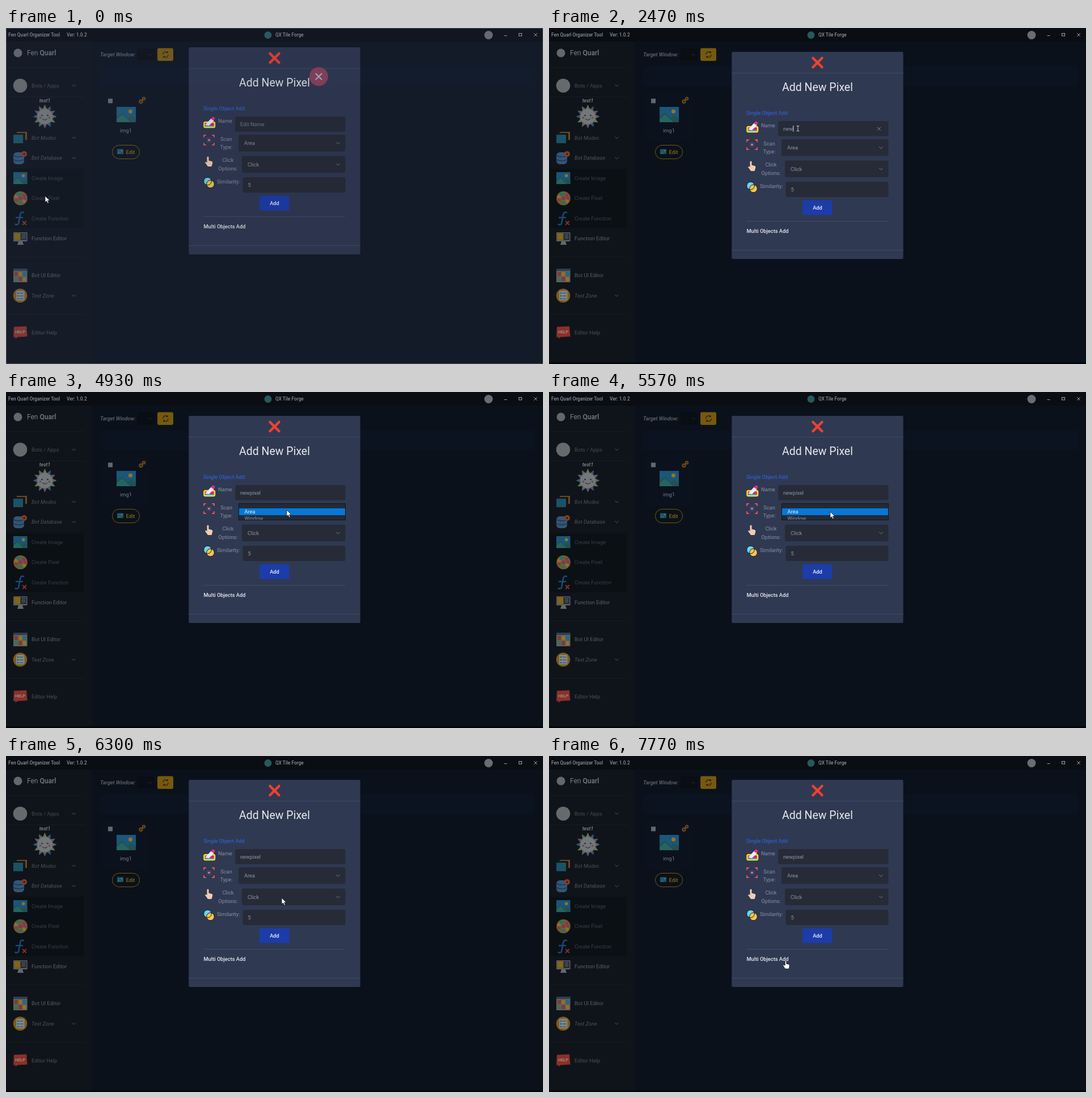
An HTML page that plays this animation: 947x592 px, repeating every 8 s.

```html
<!DOCTYPE html>
<html lang="en">
<head>
<meta charset="utf-8">
<title>Add New Pixel</title>
<style>
  html, body { margin: 0; width: 100%; height: 100%; overflow: hidden; background: #0b111b; }
  svg { display: block; width: 947px; height: 592px; font: 9.27px Roboto, sans-serif; }
  .i { font-style: italic; }
  .m { font-weight: 500; }
  .c { text-anchor: middle; }
  .line { fill: none; stroke-linecap: round; stroke-linejoin: round; }
</style>
</head>
<body>
<svg id="stage" viewBox="0 0 947 592"></svg>
<script>
const LOOP = 8000;
const NAME = 'newpixel';

const rect = (x, y, w, h, fill, r = 0, extra = '') =>
  `<rect x="${x}" y="${y}" width="${w}" height="${h}" rx="${r}" fill="${fill}" ${extra}/>`;
const circle = (x, y, r, fill, extra = '') => `<circle cx="${x}" cy="${y}" r="${r}" fill="${fill}" ${extra}/>`;
const path = (d, fill, extra = '') => `<path d="${d}" fill="${fill}" ${extra}/>`;
const line = (d, color, w = 1) => `<path class="line" d="${d}" stroke="${color}" stroke-width="${w}"/>`;
const text = (x, mid, str, fill, cls = '', size = 9.27) =>
  `<text x="${x}" y="${mid + size * .35}" fill="${fill}" class="${cls}" font-size="${size}">${str}</text>`;
const group = (id, body, extra = '') => `<g id="${id}" ${extra}>${body}</g>`;
const move = (x, y, body) => `<g transform="translate(${x} ${y})">${body}</g>`;
const dim = body => `<g opacity=".82">${body}</g>`;
const chevron = (x, y, color) => line(`M${x - 3} ${y - 1.5}l3 3 3-3`, color, .9);
const cross = (x, y, r, color, w) => line(`M${x - r} ${y - r}l${2 * r} ${2 * r}m0 ${-2 * r}l${-2 * r} ${2 * r}`, color, w);
const ring = (n, draw) => Array.from({ length: n }, (_, k) => draw(k, k * 2 * Math.PI / n)).join('');

const picture = (w, h) =>
  rect(0, 0, w, h, '#1f6590') +
  path(`M0 ${h}V${h * .62}L${w * .3} ${h * .38} ${w * .58} ${h * .75} ${w * .75} ${h * .55} ${w} ${h * .8}V${h}z`, '#28605c') +
  path(`M0 ${h}V${h * .8}L${w * .3} ${h * .5} ${w * .7} ${h}z`, '#2d7773') +
  circle(w * .72, h * .3, h * .13, '#b58a24');

function titleBar() {
  return rect(0, 0, 947, 24, '#0a0d12') +
    text(4, 12, 'Fen Quarl Organizer Tool', '#8e9298', 'm', 8.3) +
    text(107, 12, 'Ver: 1.0.2', '#8e9298', 'm', 8.3) +
    circle(462, 12.5, 6.5, '#255a5c') +
    text(475, 12, 'QX Tile Forge', '#8e9298', 'm', 8.3) +
    circle(851, 12.5, 7.5, '#696c72') +
    line('M879 13.5h4', '#a2a5aa') +
    rect(904.5, 9.5, 5, 4.5, 'none', 0, 'stroke="#a2a5aa"') +
    cross(934, 12, 2.5, '#a2a5aa', 1);
}

function flower() {
  const hues = ['#858257', '#3c6887', '#81606c', '#637a80'];
  return move(68.5, 156,
    ring(12, (k, a) => path('M-5 -10L0 -21 5 -10z', hues[k % 4], `transform="rotate(${a * 180 / Math.PI})"`)) +
    circle(0, 0, 13.5, '#8b8d90') + circle(-5, -2, 1.3, '#252b35') + circle(5, -2, 1.3, '#252b35') +
    line('M-4 4q4 4 8 0', '#4a4750', 1.2) + circle(-8, 2, 2, '#78616a') + circle(8, 2, 2, '#78616a'));
}

function sidebarIcons() {
  const dots = ['#a43d6b', '#a88824', '#317e96', '#56813d'];
  return circle(21, 44, 7.5, '#777a80') + flower() +
    circle(25, 101.5, 12.3, '#7b7d7f') +
    rect(19, 183, 18, 14, '#8a5220') + rect(16, 185, 18, 14, '#111820') + rect(13, 188, 17, 15, '#1d6078') +
    rect(13, 219, 19, 21, '#3d6589', 6) + [225, 232].map(y => line(`M13 ${y}q9.5 4 19 0`, '#1d3c5d', 1.5)).join('') +
    circle(32, 222, 5, '#a0472a') + circle(32, 222, 1.8, '#28212a') +
    move(13, 254, picture(24.5, 21)) +
    circle(25.5, 300, 12.3, '#8d7225') +
    ring(9, (k, a) => circle(25.5 + 8 * Math.cos(a), 300 + 8 * Math.sin(a), 3, dots[k % 4])) +
    circle(25.5, 300, 3.5, '#a43d6b') +
    line('M31 325q-5-2-6 4l-2.5 14q-1 5-6 3M18 334h11', '#1e568d', 2.5) + cross(32.5, 343.5, 2.7, '#a83530', 2) +
    rect(13, 360, 24.5, 16, '#6d7075', 1) + rect(14.5, 361.5, 21.5, 12, '#222b35') +
    rect(14.5, 361.5, 11, 12, '#9b7818') + [364, 367, 370].map(y => line(`M28 ${y}h6`, '#8a8d91')).join('') +
    path('M22 376h7l2 6H20z', '#777a7e') +
    rect(13, 424, 24.5, 24, '#6c737b', 1) + rect(13, 424, 24.5, 4, '#35485a') +
    ring(6, k => rect(15 + k % 3 * 7.3, k < 3 ? 430 : 439, 6, 7, ['#9d4035', '#bb8420', '#287d91', '#54824b'][k % 4])) +
    circle(25, 471.5, 12.3, '#996a17') + rect(18, 463, 14.5, 17, '#98a0a3', 2) +
    [467, 472, 477].map(y => circle(21, y, 1.3, '#285e7d') + line(`M24 ${y}h6`, '#43708a', 1.3)).join('') +
    path('M14 526.5l22-1 1.5 18-17 1-4 3v-3h-3.5z', '#a5382e') +
    text(25, 535.5, 'HELP', '#c4b1a6', 'm c', 7.4);
}

function sidebar() {
  const rows = [
    [101.5, 'Bots / Apps', '#51565e', '', 1], [193.5, 'Bot Modes', '#555a61', 'i', 1],
    [229, 'Bot Database', '#5d6269', 'i', 1], [264.5, 'Create Image', '#41474f'],
    [300, 'Create Pixel', '#41474f'], [335.5, 'Create Function', '#41474f'],
    [371, 'Function Editor', '#6d7279'], [436, 'Bot UI Editor', '#666b72'],
    [471.5, 'Test Zone', '#5a5f66', 'i', 1], [537, 'Editor Help', '#575c64']
  ];
  return rect(0, 24, 151, 568, '#0f141a') + rect(0, 248, 138, 105, '#0b1015') +
    [69, 121, 403, 504].map(y => rect(0, y, 138, 1, '#161b22')).join('') +
    dim(sidebarIcons() +
      `<text x="37" y="48" font-size="12" fill="#92959b">Fen <tspan class="m">Quarl</tspan></text>` +
      rows.map(([y, label, color, cls, open]) =>
        text(45, y, label, color, cls) + (open ? chevron(119.5, y, '#6b7078') : '')).join('') +
      text(68.5, 128, 'test1', '#a0a3a8', 'i m c', 8.8));
}

function workspace() {
  return path('M152 592V33q0-9 9-9H947V592z', '#0b111b') +
    rect(232, 36, 31, 21, '#090d14', 3) +
    rect(166, 68, 766, 34, '#0c1320', 2) + rect(170, 115, 82, 85, '#0b121d', 3) +
    dim(text(166, 47, 'Target Window:', '#777b82', 'i m') + chevron(254.5, 47, '#30363e') +
      rect(267, 35.5, 28, 22.5, '#8e690b', 3) +
      line('M277 46a4.5 4.5 0 0 1 8-2.5v-2m0 2h-2M286 47.5a4.5 4.5 0 0 1-8 2.5v2m0-2h2', '#16191e', 1.1) +
      rect(180, 124.5, 8, 8, '#777b80') +
      line('M236 131l6-6', '#805514', 2.5) + circle(238, 129.5, 3.7, '#805514') + circle(243, 124.5, 3.2, '#805514') +
      circle(238, 129.5, 1.3, '#0c1320') + circle(243, 124.5, 1.1, '#0c1320') +
      move(195, 139, picture(34, 27)) + text(211.5, 181, 'img1', '#8e9298', 'c') +
      rect(187.5, 206.5, 48, 24, '#0c1119', 12, 'stroke="#8e690b"') +
      move(196, 213.5, picture(11, 8.5)) + text(211.5, 218.5, 'Edit', '#a37a11', 'm'));
}

function modalIcons() {
  const corners = [[349, 197, 1, 1], [367, 197, -1, 1], [349, 214, 1, -1], [367, 214, -1, -1]];
  return rect(349.5, 174, 18.5, 9, '#d51e8c', 2, 'stroke="#f8e326" stroke-width="2.5"') + rect(352, 180, 14, 2, '#27b8df') +
    path('M351 179l11-12 5 4-9 9z', '#eceaf0') + path('M361 168l4-4 4 3-3 4z', '#e02b91') +
    corners.map(([x, y, a, b]) => line(`M${x} ${y + 3 * b}v${-3 * b}h${3 * a}`, '#ee505a', 2)).join('') +
    rect(354, 201.5, 8, 8, '#4a3f67') + circle(358, 205.5, 1.6, '#f08ba0') +
    path('M354.5 235.500q1.500-2 3 0v6l5.500 1.500q2 1 1 4l-1.500 5h-6.500l-5-7q1-2 3.500 0z', '#f2cdb0') +
    circle(355.5, 278, 6.8, '#6cd4e6') + circle(360.5, 283, 6.8, '#f5c64c') +
    circle(355.5, 278, 6.8, 'none', 'stroke="#141b2a"') + circle(360.5, 283, 6.8, 'none', 'stroke="#141b2a"');
}

function modal() {
  const label = '#8990a0', value = '#8e95a2', field = '#262b37';
  return rect(322.3, 42, 302.4, 365, '#2f3952', 2) +
    rect(322, 79, 303, 1, '#3f4a64') + rect(322, 391, 303, 1, '#3f4a64') + rect(348, 340, 250, 1, '#414b62') +
    cross(473.5, 61, 8, '#f0412f', 4.5) +
    text(473.5, 104.5, 'Add New Pixel', '#e7e9ed', 'c', 19.5) +
    text(348, 149.5, 'Single Object Add', '#3068e6') +
    text(374, 171.5, 'Name', label) +
    text(388.5, 203.5, 'Scan', label, 'c') + text(388.5, 218, 'Type:', label, 'c') +
    text(391.5, 241, 'Click', label, 'c') + text(391.5, 256, 'Options:', label, 'c') +
    text(372, 278.5, 'Similarity:', label) +
    rect(404, 164, 194.5, 26.5, field, 3) + rect(410, 196, 188.5, 29.5, field, 3) +
    rect(416, 233.5, 182.5, 29.5, field, 3) + rect(417.5, 271, 181, 27, field, 3) +
    text(420, 211, 'Area', value) + text(426, 248.5, 'Click', value) + text(426.5, 284.5, '5', value) +
    chevron(585.5, 211, '#7d8593') + chevron(585.5, 248.5, '#7d8593') +
    rect(447, 303.5, 52.5, 26, '#1c3ca9', 2) + text(473.5, 316.5, 'Add', '#eef0f6', 'm c') +
    text(348.5, 358, 'Multi Objects Add', '#e8eaee', 'm') +
    modalIcons() +
    text(413, 177.5, '', value).replace('<text', '<text id="name"') +
    group('caret', rect(0, 172, 1, 10.5, '#e3e6ec')) +
    group('clear', cross(582, 177.5, 2.6, '#858b98', 1));
}

function popup(id, x, y, h, first, second, rowTop) {
  const w = 599 - x;
  return `<clipPath id="${id}Clip"><rect id="${id}Open" x="${x}" y="${y}" width="${w}" height="${h}"/></clipPath>` +
    group(id, rect(x, y, w, h, '#242936') +
      text(x + 10.5, rowTop + 17.5, second, '#8a909d') +
      rect(x, rowTop, w, 12, '#0678d7') + text(x + 10.5, rowTop + 6.2, first, '#e9f2fc') +
      rect(x + .5, y + .5, w - 1, h - 1, 'none', 0, 'stroke="#11151c"'), `clip-path="url(#${id}Clip)"`);
}

const cursors =
  group('arrow', path('M0 0v11l2.6-2.3 1.8 4 1.9-.9-1.800-3.800h3.500z', '#fff', 'stroke="#10131a" stroke-width=".7"')) +
  group('beam', line('M-2-4.500h1.500l.5.500.5-.5h1.500M0-4v8M-2 4.500h1.500l.5-.5.5.5h1.500', '#e4e7ec', .9)) +
  group('hand', path('M-1.300.5q1.300-1.500 2.600 0v5l4.200 1q1.500.8 1.200 3l-1 5H-1l-4-6q1-2.200 3.700 0z', '#fff', 'stroke="#10131a" stroke-width=".8"'));

const stage = document.getElementById('stage');
stage.innerHTML = sidebar() + workspace() + titleBar() +
  rect(0, 0, 947, 592, '#45587c', 0, 'id="haze"') +
  group('modal', modal()) +
  group('ghost', circle(551.5, 85.5, 16.5, '#803e58') + cross(551.5, 85.5, 5, '#9ca1b3', 2.3)) +
  popup('scan', 410, 196, 30, 'Area', 'Window', 205) +
  popup('click', 416, 233.5, 39, 'Click', 'No Click', 242.5) +
  group('frame', rect(.5, .5, 946, 591, 'none', 0, 'stroke="#7c8088" stroke-dasharray="1 1"')) +
  rect(0, 589, 947, 3, '#030509', 0, 'id="edge"') +
  group('cursor', cursors);

const el = Object.fromEntries([...stage.querySelectorAll('[id]')].map(n => [n.id, n]));

// Each step is [ms, ...values]; values are interpolated between steps.
const pointer = [
  [70, 69, 296], [500, 439, 177], [4370, 439, 177], [4660, 498, 222], [4930, 495, 208],
  [5170, 496, 211], [5570, 496, 211], [5830, 489, 251], [6370, 486, 250], [6600, 485, 252],
  [6870, 485, 252], [7570, 417.5, 360.5]
];
const blink = [[1100, 0], [1300, 1], [1630, 1], [1770, 0], [2130, 0], [2180, 1], [3770, 1], [3970, 0]];
const keyTimes = [2130, 2230, 2470, 2800, 2970, 3100, 3300, 3470];
const smooth = k => k * k * (3 - 2 * k);

function sample(steps, t, ease = k => k) {
  const next = steps.findIndex(s => s[0] > t);
  if (next === 0) return steps[0].slice(1);
  if (next < 0) return steps.at(-1).slice(1);
  const a = steps[next - 1], b = steps[next];
  const k = ease((t - a[0]) / (b[0] - a[0]));
  return a.slice(1).map((v, n) => v + (b[n + 1] - v) * k);
}

const show = (node, on) => node.setAttribute('visibility', on ? 'visible' : 'hidden');
const shift = (node, x, y) => node.setAttribute('transform', `translate(${x} ${y})`);

function slide(id, t, from, length, until, height) {
  show(el[id], t >= from && t < until);
  el[id + 'Open'].setAttribute('height', height * Math.min(1, Math.max(0, (t - from) / length)));
}

function render(t) {
  const [entry] = sample([[70, 1], [140, 0]], t);
  shift(el.modal, 0, -8 * entry);
  el.modal.setAttribute('opacity', 1 - .1 * entry);
  el.haze.setAttribute('opacity', .13 * entry);
  el.ghost.setAttribute('opacity', entry);
  show(el.frame, t < 700);
  show(el.edge, t >= 700);

  const typed = keyTimes.filter(k => k <= t).length;
  el.name.textContent = typed ? NAME.slice(0, typed) : 'Edit Name';
  el.name.setAttribute('fill', typed ? '#8e95a2' : '#737b8a');
  shift(el.caret, typed ? 413.3 + el.name.getComputedTextLength() : 413, 0);
  el.caret.setAttribute('opacity', sample(blink, t)[0]);
  show(el.clear, typed && t < 4660);

  slide('scan', t, 4660, 150, 5960, 30);
  slide('click', t, 6330, 250, 7000, 39);

  shift(el.cursor, ...sample(pointer, t, smooth));
  const beam = t >= 430 && t < 4470, hand = t >= 7770;
  show(el.beam, beam);
  show(el.hand, hand);
  show(el.arrow, !beam && !hand);
}

const start = performance.now();
function tick() {
  render((performance.now() - start) % LOOP);
  requestAnimationFrame(tick);
}
tick();
</script>
</body>
</html>
```
